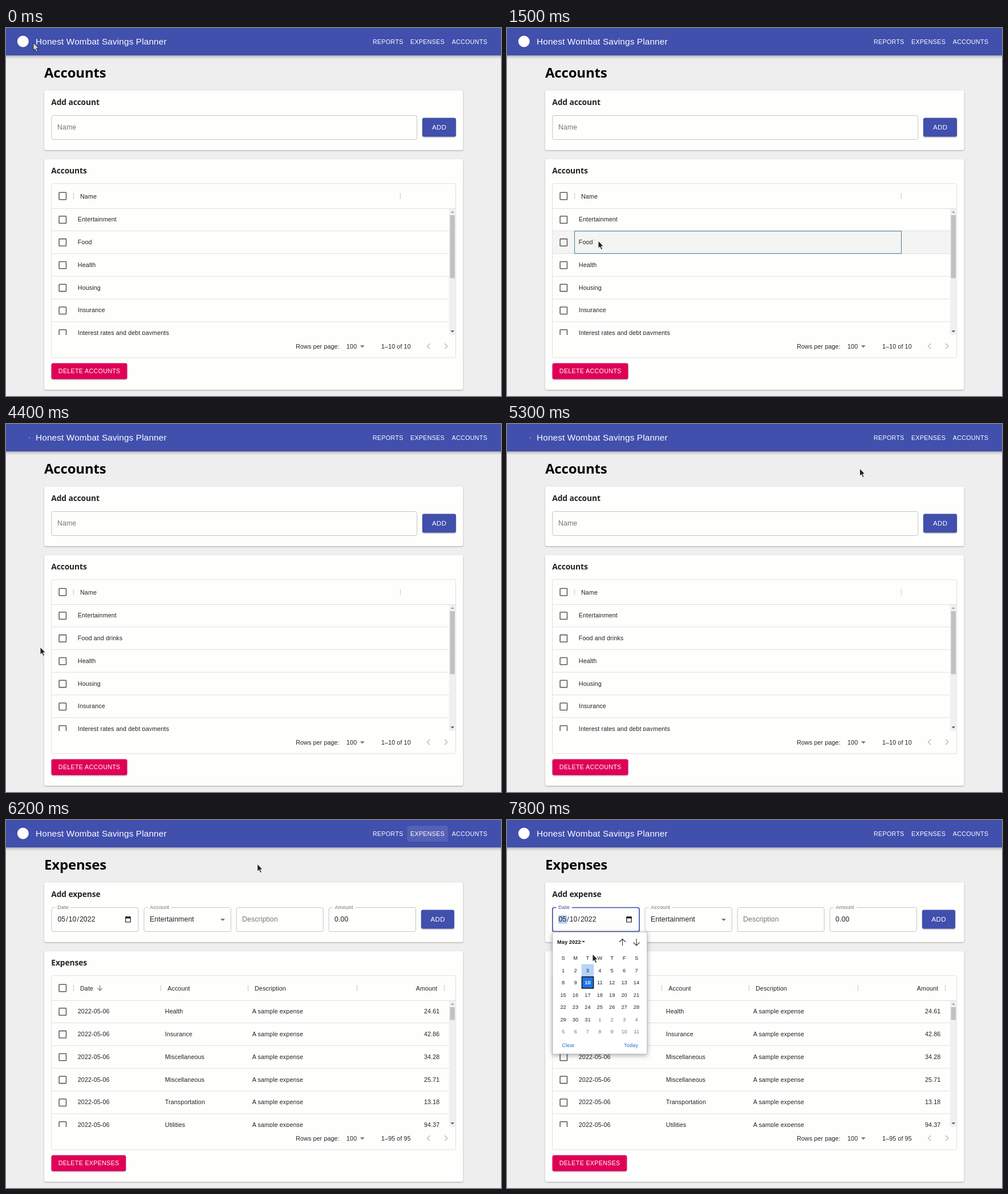
These frames come from a looping animation (868 by 645 pixels, 8 s). An HTML page:

```html
<!DOCTYPE html>
<html lang="en">
<head>
<meta charset="utf-8">
<title>Accounts and expenses</title>
<style>
  html, body { margin: 0; width: 100%; height: 100%; overflow: hidden; background: #eee; }
  svg { display: block; width: 100vw; height: 100vh; }
  text { font-family: "Liberation Sans", Arial, sans-serif; white-space: pre; }
  .head { font-family: "Noto Sans", "Open Sans", sans-serif; font-weight: 700; }
  .card { filter: drop-shadow(0 1px 1px rgba(0,0,0,.3)); }
  .btn { filter: drop-shadow(0 1.5px 1.2px rgba(0,0,0,.32)); }
  .bar { filter: drop-shadow(0 2px 2.5px rgba(0,0,0,.32)); }
  .pop { filter: drop-shadow(0 2px 4px rgba(0,0,0,.35)); }
</style>
</head>
<body>
<svg id="stage" viewBox="0 0 868 645"></svg>
<script>
const LOOP = 8000, STEP = 100;
const BLUE = '#414fad', PINK = '#df0057', PAPER = '#fefefd', INK = '#222', GREY = '#757575', LINE = '#dfdfdf';
const ROW_TOP = 316.5, ROW_H = 39.8;
const SMALL = 10.71, BODY = 12.24;

const ACCOUNTS = ['Entertainment', 'Food', 'Health', 'Housing', 'Insurance', 'Interest rates and debt payments'];
const EXPENSES = [['Health', '24.61'], ['Insurance', '42.86'], ['Miscellaneous', '34.28'],
  ['Miscellaneous', '25.71'], ['Transportation', '13.18'], ['Utilities', '94.37']];

// time, x, y of the pointer tip
const POINTER = [[0, 48, 26], [200, 48, 26], [1100, 159, 365], [1200, 160, 373], [1700, 160, 373],
  [1900, 170, 374], [3800, 170, 374], [3900, 87, 400], [4000, 87, 400], [4100, 60, 391], [4700, 60, 391],
  [5500, 722, 20], [5900, 722, 20], [6400, 288, 108], [6500, 288, 108], [6800, 208, 168],
  [7400, 208, 168], [7500, 205, 172], [7700, 205, 172], [7800, 150, 235]];

// time, number of typed letters
const FULL = 'Food and drinks';
const TYPING = [[1600, 4], [2200, 5], [2300, 6], [2600, 7], [2700, 9], [2900, 10], [3200, 12], [3400, 14], [3700, 15]];

function pointerAt(t) {
  const i = POINTER.findIndex(p => p[0] > t);
  if (i < 0) return POINTER[POINTER.length - 1].slice(1);
  const [t0, x0, y0] = POINTER[i - 1], [t1, x1, y1] = POINTER[i];
  const u = (t - t0) / (t1 - t0), k = u * u * (3 - 2 * u);
  return [x0 + (x1 - x0) * k, y0 + (y1 - y0) * k];
}

const rect = (x, y, x2, y2, fill, extra = '') =>
  `<rect x="${x}" y="${y}" width="${x2 - x}" height="${y2 - y}" fill="${fill}" ${extra}/>`;
const frame = (x, y, x2, y2, stroke, width = 1, r = 3) =>
  rect(x, y, x2, y2, 'none', `rx="${r}" stroke="${stroke}" stroke-width="${width}"`);
const path = (d, fill, extra = '') => `<path d="${d}" fill="${fill}" ${extra}/>`;
const stroke = (d, color, width = 1) => path(d, 'none', `stroke="${color}" stroke-width="${width}"`);
const text = (s, x, y, size = SMALL, fill = INK, extra = '') =>
  `<text x="${x}" y="${y}" font-size="${size}" fill="${fill}" letter-spacing="${size * 0.0105}" ${extra}>${s}</text>`;
const caps = (s, x, y, size = SMALL, extra = '') =>
  `<text x="${x}" y="${y}" font-size="${size}" fill="#fff" letter-spacing="${size * 0.0286}" ${extra}>${s}</text>`;
const heading = (s, x, y, size, fill = INK) =>
  `<text class="head" x="${x}" y="${y}" font-size="${size}" letter-spacing="${-size * 0.008}" fill="${fill}">${s}</text>`;
const END = 'text-anchor="end"', MID = 'text-anchor="middle"';
const arrowDown = (x, y, w, fill = GREY) => path(`M${x - w} ${y}h${2 * w}l${-w} ${w}z`, fill);
const checkbox = y => frame(93.1, y - 6.2, 105.5, y + 6.2, '#5c5c5c', 1.55, 0.8);

function button(s, x, y, x2, y2, fill, size) {
  return rect(x, y, x2, y2, fill, 'rx="3" class="btn"') +
    caps(s, (x + x2) / 2 + 0.2, (y + y2) / 2 + size * 0.36, size, MID);
}

function appBar(t, [px, py]) {
  const gone = t >= 4200 && t < 6000;
  let out = rect(-6, -6, 874, 48, BLUE, 'class="bar"');
  out += gone ? '<circle cx="41" cy="24" r="0.8" fill="#fff"/>' : '<circle cx="29.8" cy="23.5" r="10" fill="#fff"/>';
  out += text('Honest Wombat Savings Planner', 52, 29, 15.3, '#fff');
  if (px > 704 && px < 775 && py < 38) out += rect(704, 10, 775, 38, '#000', 'rx="3" opacity=".04"');
  if (t >= 5700 && t < 6300) {
    const r = 22 + (t - 5700) * 0.165;
    const fade = Math.min(1, (6300 - t) / 300) * 0.3;
    out += `<clipPath id="nav"><rect x="703.5" y="10" width="71.5" height="28" rx="3"/></clipPath>
      <circle cx="722" cy="22" r="${r}" fill="#fff" opacity="${fade}" clip-path="url(#nav)"/>`;
  }
  return out + caps('REPORTS', 643, 27.6) + caps('EXPENSES', 709, 27.6) + caps('ACCOUNTS', 781.7, 27.6);
}

function field(x, x2, label, edge = '#c4c4c4', width = 1, tint = GREY) {
  let out = frame(x, 153.5, x2, 195.5, edge, width);
  if (label) {
    const [s, w] = label;
    out += rect(x + 6.5, 151, x + 14 + w, 156, PAPER) + text(s, x + 10.3, 156.4, 9.18, tint);
  }
  return out;
}

function dateField(t) {
  const focus = t >= 7200, hover = t >= 6700 && !focus;
  let out = field(79.8, 232, ['Date', 20], focus ? BLUE : hover ? INK : '#c4c4c4', focus ? 1.7 : 1, focus ? BLUE : GREY);
  if (t >= 7500) out += rect(90, 167, 105, 181.5, '#b0cdf5');
  [['05', 90.4], ['/', 105.2], ['10', 109.7], ['/', 124.6], ['2022', 128.9]]
    .forEach(([s, x]) => out += text(s, x, 178.4, BODY));
  return out + frame(209.8, 170.2, 218.2, 179, '#111', 1.2, 0.6) + rect(209.4, 169.6, 218.6, 172.4, '#111') +
    rect(210.8, 168.5, 212, 170, '#111') + rect(216, 168.5, 217.2, 170, '#111');
}

function forms(t, expenses) {
  if (!expenses) {
    return field(79.8, 720.7) + text('Name', 90, 178.4, BODY, GREY) +
      button('ADD', 730, 157.5, 789, 190.5, BLUE, 11.5);
  }
  const settled = t >= 6000;
  let out = dateField(t) + field(242, 394.3, settled ? ['Account', 34] : null);
  if (!settled) out += text('Account', 252.3, 168.4, 11.1, GREY);
  return out + text('Entertainment', 252, 178.4, BODY) + arrowDown(380, 172.9, 4) +
    field(404.2, 556.3) + text('Description', 414, 178.4, BODY, GREY) +
    field(566.2, 718.5, ['Amount', 33]) + text('0.00', 576, 178.4, BODY) +
    button('ADD', 728, 157.5, 786, 190.5, BLUE, 11.5);
}

function editor(t) {
  if (t < 1500 || t >= 3900) return '';
  if (t < 1600) return frame(118.5, 356, 691.5, 395.3, '#4b7a99', 1, 0);
  const n = TYPING.filter(k => k[0] <= t).pop()[1];
  return rect(118.5, 356, 691.5, 395.3, PAPER, 'stroke="#4b7088" class="card"') +
    text(FULL.slice(0, n) + '<tspan fill="#111" dx="-.9" font-weight="400" font-size="13">\u200b</tspan>', 131, 379.6) +
    `<rect id="caret" x="${131 + widthOf(FULL.slice(0, n))}" y="369.5" width="1" height="12.5" fill="#222"/>`;
}

const pen = document.createElement('canvas').getContext('2d');
function widthOf(s) {
  pen.font = `100px "Liberation Sans", Arial, sans-serif`;
  return pen.measureText(s).width * SMALL / 100 + s.length * SMALL * 0.0105;
}

function table(t, expenses, [px, py]) {
  const filled = !expenses || t >= 6000;
  let out = frame(79.6, 272.7, 788.6, 577.8, LINE) + stroke(`M80 ${ROW_TOP}H788.5`, LINE);
  let rows = '';
  if (filled) {
    out += checkbox(294.5);
    (expenses ? [118.5, 271.5, 424.5, 615.5, 768.5] : [118.5, 691.5])
      .forEach(x => out += stroke(`M${x} 289.2V300`, '#d2d2d2', 1.3));
    if (expenses) {
      out += text('Date', 130, 298.6) + stroke('M164.6 290v8.6M160.4 294.6l4.2 4.2l4.2-4.2', '#666', 1.1) +
        text('Account', 283.2, 298.6) + text('Description', 436, 298.6) + text('Amount', 756.2, 298.6, SMALL, INK, END);
    } else out += text('Name', 130, 298.6);

    const over = !expenses && px > 80 && px < 777 && py > ROW_TOP && py < 538 ? Math.floor((py - ROW_TOP + 0.6) / ROW_H) : -1;
    for (let i = 0; i < 6; i++) {
      const top = ROW_TOP - 0.8 + i * ROW_H, base = 339.1 + i * ROW_H;
      if (i === over) rows += rect(80, top + 0.5, 777, top + ROW_H, '#f4f4f4');
      rows += stroke(`M80 ${top + ROW_H}H777`, LINE) + checkbox(336 + i * ROW_H);
      if (expenses) {
        const [name, sum] = EXPENSES[i];
        rows += text('2022-05-06', 125.8, base) + text(name, 278.8, base) +
          text('A sample expense', 431.8, base) + text(sum, 760.4, base, SMALL, INK, END);
      } else rows += text(i === 1 && t >= 3900 ? FULL : ACCOUNTS[i], 125.8, base);
    }
    if (!expenses) rows += editor(t);
  }
  out += `<clipPath id="body"><rect x="80" y="316" width="708" height="222"/></clipPath><g clip-path="url(#body)">${rows}</g>`;
  out += rect(777, 317, 788.4, 538, '#f0f0f0') + rect(778.5, 328, 787, expenses ? 350.5 : 438.5, '#c1c1c1') +
    path('M779.6 324h6.4l-3.2-3.2z', '#a3a3a3') + arrowDown(782.8, 530.2, 3.2, '#505050');
  return out + text('Rows per page:', 508.2, 561.9) + text('100', 597, 561.9) + arrowDown(624.8, 556.2, 4) +
    text(expenses ? '1–95 of 95' : '1–10 of 10', 658, 561.9) +
    stroke('M743.2 553l-4.6 4.6l4.6 4.6M769.2 553l4.6 4.6l-4.6 4.6', '#b8b8b8', 1.4);
}

function calendar(t) {
  if (t < 7300) return '';
  const cx = i => 98.6 + 21.4 * i, size = 9.2;
  const day = (s, i, y, fill = INK, extra = '') => text(s, cx(i), y + 3.3, size, fill, MID + extra);
  let out = rect(80, 196.5, 245.5, 410, '#fff', 'stroke="#bdbdbd" stroke-width=".8" class="pop"') +
    text('May 2022', 88, 216.6, size, '#111', 'font-weight="700"') + arrowDown(134.2, 211.9, 2.6, '#111') +
    stroke('M202.5 220.5V208.8M197 214l5.5-5.5l5.5 5.5M227 208V219.7M221.5 214.5l5.5 5.5l5.5-5.5', '#333', 1.1);
  [...'SMTWTFS'].forEach((s, i) => out += day(s, i, 241.3));
  if (t >= 7800) out += rect(130.7, 252.8, 152.1, 274.4, '#b5d3f8');
  out += rect(131.4, 274.9, 151.6, 295, '#1a73e8', t >= 7800 ? 'stroke="#111" stroke-width="1.5"' : '');
  for (let k = 0; k < 42; k++) {
    const n = k % 31 + 1, y = 263.7 + 21.4 * Math.floor(k / 7);
    out += k === 9 ? day(n, 2, y, '#fff', ' font-weight="700"') : day(n, k % 7, y, k > 30 ? '#777' : INK);
  }
  return out + text('Clear', 96.2, 397.9, size, '#1873c9') + text('Today', 205, 397.9, size, '#1873c9');
}

function pointer(t, [x, y]) {
  if (t >= 1600 && t < 3900) {
    const d = `M${x - 3} ${y - 7}q3 0 3 1.5q0-1.5 3-1.5M${x} ${y - 6}V${y + 6}M${x - 3} ${y + 7}q3 0 3-1.5q0 1.5 3 1.5`;
    return stroke(d, '#fff', 2.4) + stroke(d, '#333', 1.1);
  }
  if (y < 38 && x > 640) {
    return path(`M${x} ${y}q1.4-1.6 2.4 .3l.6 4.4q1.2-.8 2 .2q1.2-.7 1.9 .4q1.5-.4 1.8 1.2q.2 3.3-1.2 6.2h-6q-1.2-2.6-4.2-5.4q.6-1.8 3 .2z`,
      '#fff', 'stroke="#222" stroke-width="1" stroke-linejoin="round"');
  }
  const early = t < 300;
  return path(`M${x} ${y}v13.2l3-2.6l2.2 5l2.3-1l-2.2-4.9h4z`, early ? '#d8d8d8' : '#222',
    `stroke="${early ? '#222' : '#fff'}" stroke-width=".9" stroke-linejoin="round"`);
}

function scene(t) {
  const at = pointerAt(t), expenses = t >= 5900;
  const plural = expenses ? 'Expenses' : 'Accounts';
  return rect(0, 0, 868, 645, '#eee') + appBar(t, at) +
    heading(plural, 67, 87.3, 24, '#050505') +
    rect(67, 109.5, 801.5, 214, PAPER, 'rx="3" class="card"') +
    rect(67, 230, 801.5, 634, PAPER, 'rx="3" class="card"') +
    heading(expenses ? 'Add expense' : 'Add account', 79.3, 134.6, 13.8) +
    heading(plural, 79.3, 254.8, 13.8) +
    forms(t, expenses) + table(t, expenses, at) +
    button('DELETE ' + plural.toUpperCase(), 79.6, 587.6, expenses ? 210.2 : 212.4, 615.6, PINK, SMALL) +
    calendar(t) + pointer(t, at);
}

const stage = document.getElementById('stage');
let shown = -1;
function tick() {
  // the screen refreshes ten times a second
  const t = Math.floor(performance.now() % LOOP / STEP) * STEP;
  if (t !== shown) stage.innerHTML = scene(shown = t);
  requestAnimationFrame(tick);
}
tick();
</script>
</body>
</html>
```
